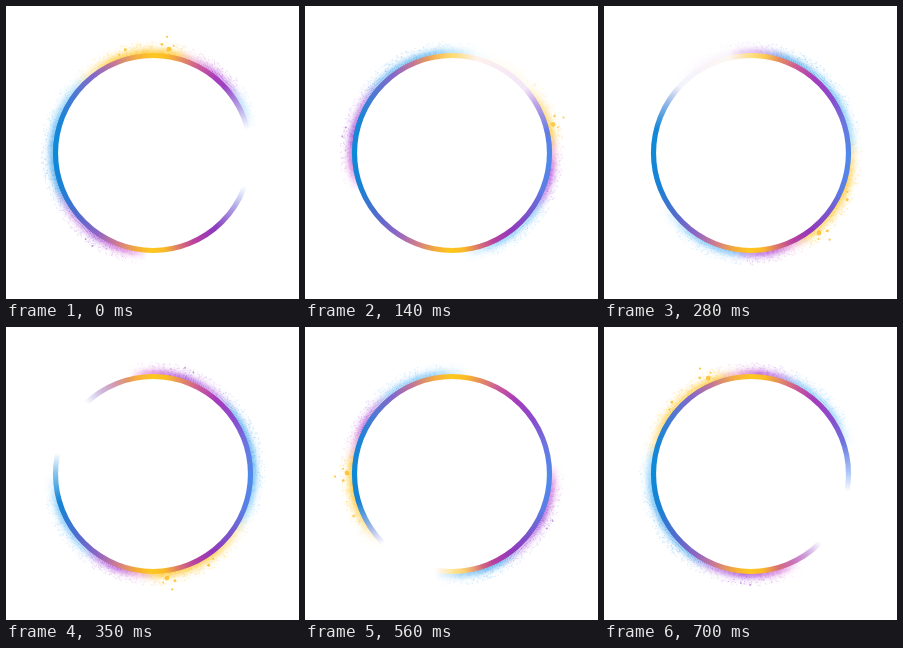
An HTML page with a canvas for the animation above (770 ms loop, 293 px wide and 293 px high).

```html
<!DOCTYPE html>
<html lang="en">
<head>
<meta charset="utf-8">
<title>Glowing ring</title>
<style>
  html, body { margin: 0; width: 100%; height: 100%; overflow: hidden; background: #fff; }
  canvas { display: block; width: 100vw; height: 100vh; }
</style>
</head>
<body>
<canvas id="stage" width="293" height="293"></canvas>
<script>
const ctx = document.getElementById('stage').getContext('2d');
const CX = 147, CY = 147, RADIUS = 97.5, BAND = 5.2;
const STEP_MS = 70, STEPS = 11, TURN = 360 / STEPS;
const TAU = Math.PI * 2;
const rad = deg => deg * Math.PI / 180;

// Angles run clockwise from the top, in degrees.
const ringStops = [
  [0, '#fec81f'], [8, '#fcbc26'], [17, '#e48b62'], [28, '#cb5a98'], [40, '#a83bbb'],
  [56, '#8a4ccc'], [72, '#6d74e0'], [92, '#4d8aec'], [112, '#5c7de4'], [128, '#7a55cc'],
  [143, '#9238bc'], [155, '#b9429f'], [164, '#d97272'], [173, '#fab828'], [181, '#fec81f'],
  [189, '#f6ae36'], [201, '#d27c8c'], [214, '#9066c4'], [228, '#5a69cc'], [248, '#1d80d4'],
  [270, '#0c8ad8'], [292, '#1f84d6'], [309, '#5577d2'], [323, '#8568c8'], [337, '#c67894'],
  [350, '#f4ac42'], [360, '#fec81f']
];
const glowStops = [
  [0, 'rgba(255,196,36,1)'], [14, 'rgba(255,196,36,.95)'], [24, 'rgba(226,130,190,.65)'],
  [36, 'rgba(176,66,212,1)'], [49, 'rgba(166,90,222,.85)'], [60, 'rgba(86,176,246,.85)'],
  [86, 'rgba(86,184,248,.8)'], [108, 'rgba(120,200,252,0)'], [183, 'rgba(210,90,210,0)'],
  [196, 'rgba(206,90,210,.85)'], [215, 'rgba(156,62,212,1)'], [234, 'rgba(172,90,220,.8)'],
  [250, 'rgba(48,152,232,.9)'], [288, 'rgba(72,174,242,.9)'], [310, 'rgba(120,204,250,.7)'],
  [321, 'rgba(255,208,90,.6)'], [336, 'rgba(255,196,36,1)'], [360, 'rgba(255,196,36,1)']
];
// [angle, distance, radius]
const goldSparks = [[8.7, 105, 2.4], [4.7, 109, 1.4], [6.9, 117, 1.1], [-15, 107, 1.4], [11, 109, .9], [-19, 104, 1]];
const violetSparks = [[213.2, 111, 1], [218, 109.5, .9]];
const gapStrength = [1, .95, .88, .82, .92, 1, .9, .76, 1, 1, 1];

let seed = 11;
const random = () => (seed = seed * 16807 % 2147483647) / 2147483647;
const grains = Array.from({ length: 1500 }, () => ({
  angle: random() * 360,
  distance: 102 + 10 * Math.pow(random(), 1.4),
  alpha: .12 + .25 * random()
}));

function conic(turn, stops) {
  const gradient = ctx.createConicGradient(rad(turn - 90), CX, CY);
  for (const [angle, color] of stops) gradient.addColorStop(angle / 360, color);
  return gradient;
}

function point(angle, distance) {
  const a = rad(angle - 90);
  return [CX + distance * Math.cos(a), CY + distance * Math.sin(a)];
}

function circle(radius, width, style) {
  ctx.strokeStyle = style;
  ctx.lineWidth = width;
  ctx.beginPath();
  ctx.arc(CX, CY, radius, 0, TAU);
  ctx.stroke();
}

function drawSparks(sparks, turn, color) {
  ctx.fillStyle = color;
  for (const [angle, distance, size] of sparks) {
    ctx.beginPath();
    ctx.arc(...point(angle + turn, distance), size, 0, TAU);
    ctx.fill();
  }
}

// The gap runs against the glow and hurries over the last steps.
function gapCenter(step) {
  return step <= 8 ? 93 - 30.7 * step : -152.6 - 45 * (step - 8);
}

function eraseGap(step) {
  const ink = a => `rgba(0,0,0,${a * gapStrength[step]})`;
  const stops = [
    [0, ink(0)], [134, ink(0)], [151, ink(.5)], [163, ink(1)],
    [197, ink(1)], [209, ink(.5)], [226, ink(0)], [360, ink(0)]
  ];
  ctx.globalCompositeOperation = 'destination-out';
  circle(RADIUS + 9, 30, conic(gapCenter(step) - 180, stops));
  ctx.globalCompositeOperation = 'source-over';
}

function drawGlow(turn) {
  const glow = conic(turn, glowStops);
  for (let r = 98; r <= 113; r++) {
    ctx.globalAlpha = .85 * Math.exp(-(((r - 99.5) / 5.2) ** 2));
    circle(r, 1, glow);
  }
  ctx.fillStyle = glow;
  for (const { angle, distance, alpha } of grains) {
    const [x, y] = point(angle + turn, distance);
    ctx.globalAlpha = alpha;
    ctx.fillRect(x - .5, y - .5, 1, 1);
  }
  ctx.globalAlpha = 1;
}

function draw(step) {
  const turn = step * TURN;
  ctx.clearRect(0, 0, 293, 293);
  drawGlow(turn);
  circle(RADIUS, BAND, conic(0, ringStops));
  drawSparks(goldSparks, turn, 'rgba(253,190,40,.85)');
  drawSparks(violetSparks, turn, 'rgba(160,90,200,.6)');
  eraseGap(step);
}

const start = performance.now();
function tick() {
  const elapsed = Math.max(0, performance.now() - start);
  draw(Math.floor(elapsed / STEP_MS) % STEPS);
  requestAnimationFrame(tick);
}
tick();
</script>
</body>
</html>
```
